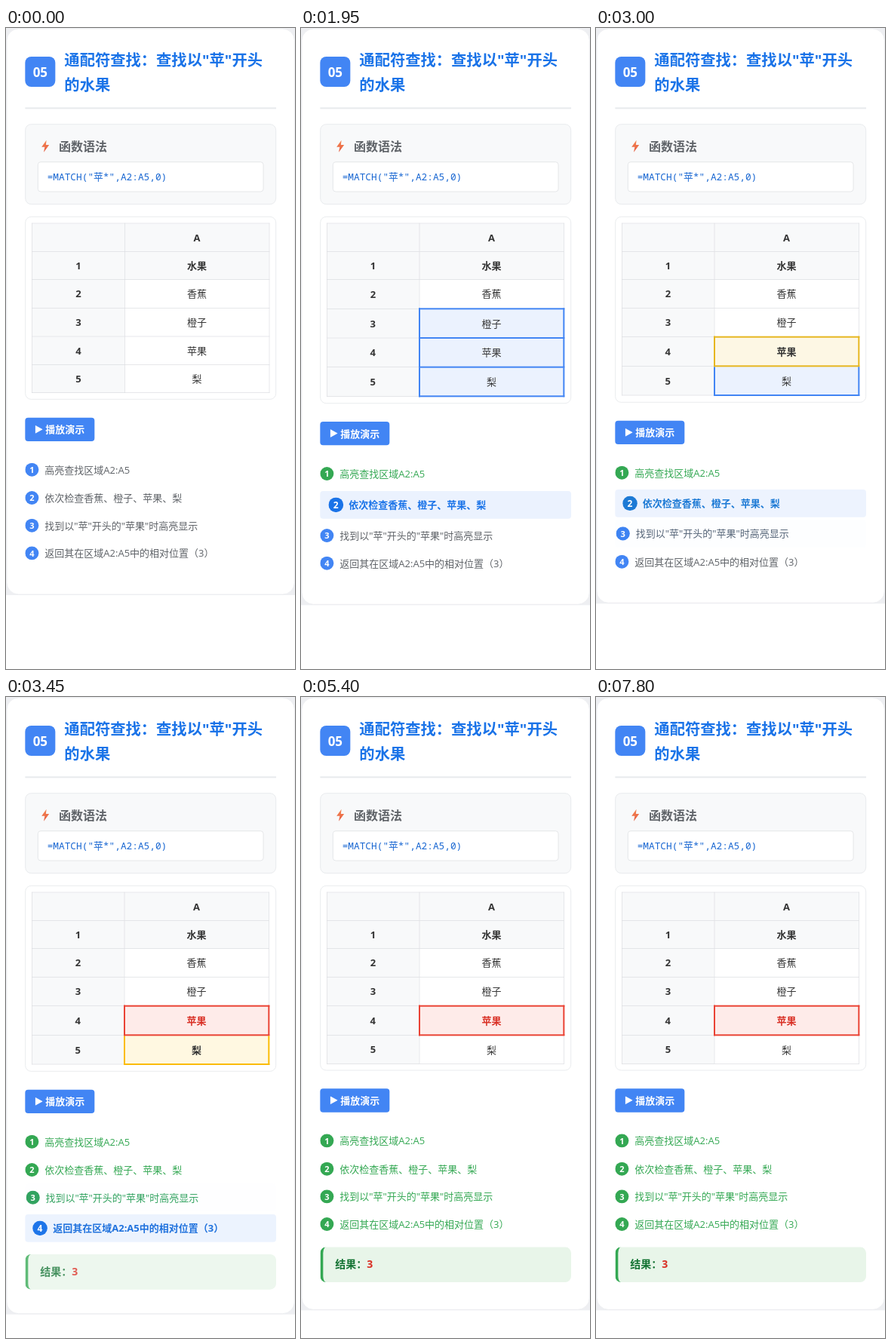
An HTML page for the animation above (8 s loop, 383 by 850 pixels).

```html
<!DOCTYPE html>
<html lang="zh-CN">
<head>
<meta charset="utf-8">
<title>通配符查找</title>
<style>
  html, body { margin: 0; width: 100%; height: 100%; overflow: hidden; background: #fff; }
  * { box-sizing: border-box; }

  /* Laid out at 1.5x and scaled back, so hairlines are two thirds of a pixel. */
  .fit { width: 574.5px; height: 1275px; transform: scale(.666667); transform-origin: 0 0; }
  .page {
    zoom: 1.5; width: 383px; padding: .67px; background: #eeeff2;
    font: 13px/1.6 "Open Sans", "Noto Sans CJK SC", "Noto Sans CJK", sans-serif; color: #333;
  }
  .card { background: #fff; border: 1px solid #e8eaed; border-radius: 16px; padding: 24px; }

  header { display: flex; align-items: center; gap: 12px; padding-bottom: 15px; margin-bottom: 20px; border-bottom: 2px solid #e8eaed; }
  .badge { flex: none; width: 40px; height: 40px; border-radius: 8px; background: #4285f4; color: #fff; font-size: 17px; font-weight: 700; line-height: 40px; text-align: center; }
  h1 { position: relative; top: .8px; margin: 0; font-size: 20.3px; font-weight: 700; line-height: 32.5px; color: #1a73e8; }

  .syntax { padding: 16px; margin-bottom: 16px; background: #f8f9fa; border: 1px solid #dfe2e6; border-radius: 8px; }
  h2 { display: flex; align-items: center; gap: 8px; margin: 0 0 8px; font-size: 16px; font-weight: 700; line-height: 25.6px; color: #5f6368; }
  h2 svg { width: 20px; height: 20px; }
  code {
    display: block; padding: 8px 12px; background: #fff; border: 1px solid #dadce0; border-radius: 4px; color: #1967d2;
    font: 12.8px/22.4px "Noto Sans Mono", "Noto Sans CJK SC", "Noto Sans CJK", monospace;
  }

  .sheet { padding: 8px; margin-bottom: 24px; border: 1px solid #dfe2e6; border-radius: 8px; }
  table { width: 100%; border-collapse: collapse; font-size: 13px; }
  th, td { padding: 8px 12px; border: 1px solid #dadce0; text-align: center; background: #fff; }
  th { background: #f8f9fa; font-weight: 700; }
  th:first-child { padding: 8px 12.28px; }

  .play { display: flex; align-items: center; width: 92px; height: 31.3px; padding-left: 13px; border-radius: 4px; background: #4285f4; color: #fff; font-weight: 700; white-space: nowrap; }
  .play svg { width: 10px; height: 11px; margin-right: 4px; }

  ul { list-style: none; margin: 19.5px 0 12px; padding: 0; }
  li { display: flex; align-items: center; gap: 8px; padding: 8px 0; border-radius: 4px; color: #5f6368; white-space: nowrap; }
  li i { flex: none; width: 18px; height: 18px; border-radius: 50%; background: #4285f4; color: #fff; font: 700 11px/18px "Open Sans", sans-serif; text-align: center; }

  .slot { height: 0; }
  .result { height: 46.4px; padding: 12px 16px; border-left: 4px solid #34a853; border-radius: 8px; background: #e8f5e9; color: #137333; font-size: 14px; font-weight: 700; opacity: 0; }
  .result b { color: #d93025; }
</style>
</head>
<body>
<div class="fit"><div class="page"><main class="card">
  <header><div class="badge">05</div><h1>通配符查找：查找以"苹"开头的水果</h1></header>

  <section class="syntax">
    <h2>
      <svg viewBox="0 0 20 20">
        <linearGradient id="glow" x2="0" y2="1"><stop stop-color="#f58a55"/><stop offset="1" stop-color="#e5583e"/></linearGradient>
        <path d="M11.6 2.2 5.2 11.2H9.4L8 18 15.2 8.4H10.9Z" fill="url(#glow)"/>
      </svg>函数语法
    </h2>
    <code>=MATCH("苹*",A2:A5,0)</code>
  </section>

  <div class="sheet"><table>
    <tr><th></th><th>A</th></tr>
    <tr><th>1</th><th>水果</th></tr>
    <tr><th>2</th><td>香蕉</td></tr>
    <tr><th>3</th><td>橙子</td></tr>
    <tr><th>4</th><td>苹果</td></tr>
    <tr><th>5</th><td>梨</td></tr>
  </table></div>

  <div class="play"><svg viewBox="0 0 10 11"><path d="M0 0 10 5.5 0 11Z" fill="#fff"/></svg>播放演示</div>

  <ul>
    <li><i>1</i>高亮查找区域A2:A5</li>
    <li><i>2</i>依次检查香蕉、橙子、苹果、梨</li>
    <li><i>3</i>找到以"苹"开头的"苹果"时高亮显示</li>
    <li><i>4</i>返回其在区域A2:A5中的相对位置（3）</li>
  </ul>

  <div class="slot"><div class="result">结果：<b>3</b></div></div>
</main></div></div>

<script>
const LOOP = 8000, TICK = 150;
const all = selector => [...document.querySelectorAll(selector)];
const animations = [];

function add(el, keys, timing) {
  const animation = el.animate(keys, timing);
  animation.pause();
  animations.push(animation);
}

// Holds each state until the next start time, then eases into the new one.
function play(el, first, changes, length = 150) {
  const keys = [{ offset: 0, ...first }];
  let state = first;
  for (const [start, next] of changes) {
    keys.push({ offset: start / LOOP, ...state, easing: 'ease' }, { offset: (start + length) / LOOP, ...next });
    state = next;
  }
  keys.push({ offset: 1, ...state });
  add(el, keys, { duration: LOOP, fill: 'both' });
}

const cell = (backgroundColor, borderColor, borderWidth, color, fontWeight) =>
  ({ backgroundColor, borderColor, borderWidth, color, fontWeight });
const plain = cell('#fff', '#dadce0', '1px', '#333', 400);
const ranged = cell('#ebf2fe', '#4285f4', '2px', '#333', 400);
const checking = cell('#fff8e1', '#fbbc04', '2px', '#333', 700);
const found = cell('#feebe9', '#ea4335', '2px', '#d93025', 700);

const cells = all('td');
[
  [[1350, ranged], [1550, checking], [1790, plain]],
  [[1350, ranged], [2230, checking], [2700, plain]],
  [[1350, ranged], [2910, checking], [3080, found]],
  [[1350, ranged], [3290, checking], [3750, plain]],
].forEach((changes, n) => play(cells[n], plain, changes));

const rest = '0 0 0 0 rgba(234,67,53,0)', ring = '0 0 0 3px rgba(234,67,53,.25)';
add(cells[2], [
  { boxShadow: rest, easing: 'ease-in-out' },
  { offset: .375, boxShadow: ring },
  { offset: .5, boxShadow: ring, easing: 'ease-in-out' },
  { offset: .75, boxShadow: rest },
  { boxShadow: rest },
], { delay: 3300, duration: 1200, iterations: 4 });

const step = (color, backgroundColor, fontWeight, padding, margin) =>
  ({ color, backgroundColor, fontWeight, padding, margin });
const idle = step('#5f6368', 'rgba(235,242,254,0)', 400, '8px 0px', '0px');
const active = step('#1a73e8', 'rgba(235,242,254,1)', 700, '8px 12px', '4px 0px');
const done = step('#34a853', 'rgba(235,242,254,0)', 400, '8px 0px', '0px');
const dot = (backgroundColor, scale) => ({ backgroundColor, transform: `scale(${scale})` });

const starts = [1350, 1550, 2982, 3354, 4000];
all('li').forEach((li, n) => {
  const [on, off] = starts.slice(n, n + 2);
  play(li, idle, [[on, active], [off, done]]);
  play(li.firstChild, dot('#4285f4', 1), [[on, dot('#1a73e8', 1.1)], [off, dot('#34a853', 1)]]);
});

play(all('.slot')[0], { height: '0px' }, [[starts[3], { height: '58.4px' }]], 1);
play(all('.result')[0],
  { opacity: 0, transform: 'translateY(20px)' },
  [[starts[3], { opacity: 1, transform: 'translateY(0px)' }]], 200);

// The picture advances in ticks.
const begin = performance.now();
function draw() {
  const time = (performance.now() - begin) % LOOP;
  const tick = Math.floor(time / TICK) * TICK;
  for (const animation of animations) animation.currentTime = tick;
  requestAnimationFrame(draw);
}
draw();
</script>
</body>
</html>
```
